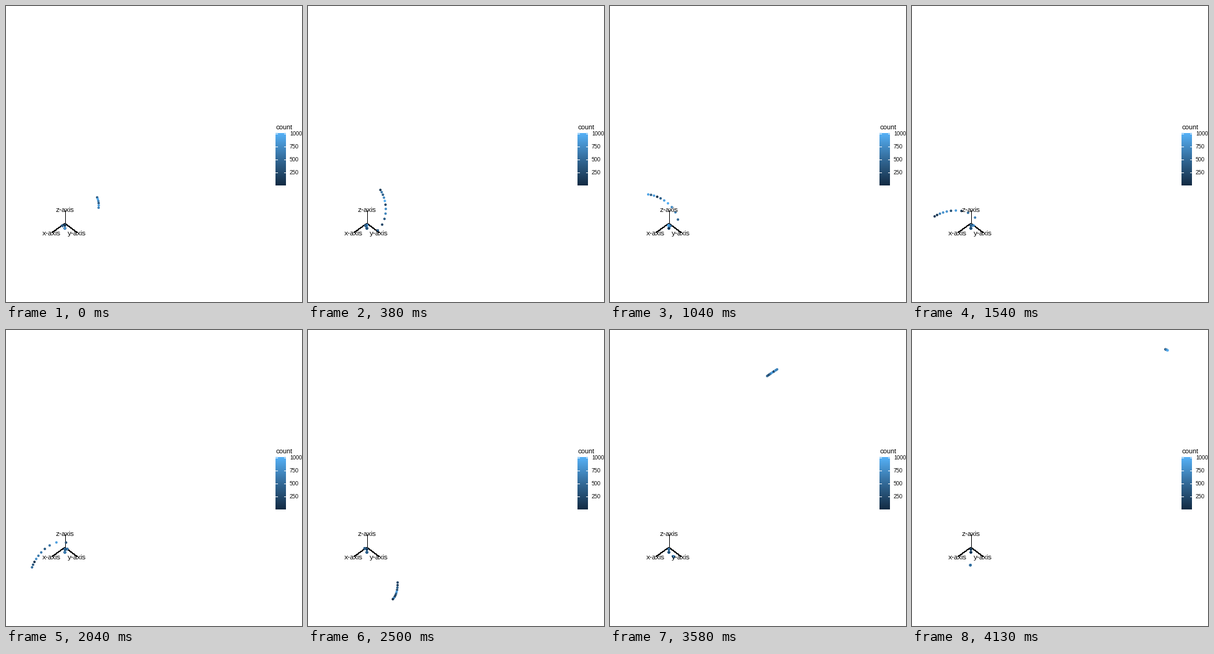
Animation, 480 px wide and 480 px high, one loop 4.17 s. Source, as a matplotlib script:

```python
import numpy as np
import matplotlib.pyplot as plt
from matplotlib.animation import FuncAnimation
from matplotlib.colors import LinearSegmentedColormap

SIZE = 480
POSES = 100
STEPS = 1000
TICK_MS = 10
TICKS = 417
CENTER = np.array([95.0, 355.0])
SLOWING = 499   # step where the orbit starts to widen
KICK = 773      # step of the last close pass, after which the comet leaves

plt.rcParams.update({
    "font.family": "Liberation Sans",
    "text.hinting": "native",
    "text.hinting_factor": 1,
})
cmap = LinearSegmentedColormap.from_list(
    "blues", ["#132B43", "#336A98", "#56B1F7"])


def kepler(m, e):
    """Eccentric anomaly from mean anomaly."""
    m = (m + np.pi) % (2 * np.pi) - np.pi
    ecc = np.pi * np.sign(m)
    for _ in range(40):
        ecc -= (ecc - e * np.sin(ecc) - m) / (1 - e * np.cos(ecc))
    return ecc


def ellipse(m, a, e, peri):
    """Clockwise Kepler orbit around CENTER; peri in degrees."""
    ecc = kepler(m, e)
    z = a * (np.cos(ecc) - e) - 1j * a * np.sqrt(1 - e**2) * np.sin(ecc)
    z = z * np.exp(1j * np.radians(peri))
    return CENTER + np.column_stack([z.real, -z.imag])


def comet_path(s):
    """Precessing rosette, then one long ellipse outwards."""
    turns = .581 + s / 40.2 - .00295 * np.maximum(s - SLOWING, 0)
    bound = ellipse(
        2 * np.pi * turns,
        a=np.interp(s, [SLOWING, 600, KICK], [44, 54, 45]),
        e=np.interp(s, [0, SLOWING, KICK], [.60, .76, .69]),
        peri=np.interp(s, [0, 90, SLOWING, KICK], [-130, -83, 56, 193]))
    escape = ellipse(.0123 * (s - KICK), 235, .947, 231 - .033 * (s - KICK))
    return np.where((s < KICK)[:, None], bound, escape)


def heavy_path(s, comet):
    """Recoil of the heavy body, then its slow drift."""
    recoil = CENTER - (comet - CENTER) * (.075, .02)
    t = [KICK, 800, 868, 923, 999]
    drift = np.column_stack([np.interp(s, t, [95, 82, 103, 101, 94]),
                             np.interp(s, t, [355, 358, 367, 374, 381])])
    return np.where((s < KICK)[:, None], recoil, drift)


steps = np.arange(STEPS, dtype=float)
comet = comet_path(steps)
bodies = [
    np.tile(CENTER + (0, 5), (STEPS, 1)),
    np.tile(CENTER, (STEPS, 1)),
    heavy_path(steps, comet),
    comet,
]
rng = np.random.default_rng(11)
colors = [cmap(rng.permutation(STEPS) / (STEPS - 1)) for _ in bodies]

fig = plt.figure(figsize=(SIZE / 72, SIZE / 72), dpi=72, facecolor="white")
ax = fig.add_axes([0, 0, 1, 1])
ax.axis("off")


def label(x, y, text, size, ha="left"):
    ax.text(x, y, text, size=size, ha=ha, va="center_baseline",
            color="black", zorder=5)


# Axis tripod
for name, dx, dy, gap in [("x-axis", -21, 15, 1.5), ("y-axis", 20, 15, 1.5),
                          ("z-axis", 0, -22, -.5)]:
    ax.plot([95.5, 95.5 + dx], [352.5, 352.5 + dy], color="black", lw=.75,
            solid_capstyle="butt", antialiased=False, zorder=2)
    label(95.3 + dx, 352 + dy + gap, name, 11, "center")

# Colour bar
ax.imshow(np.linspace(1, 0, 256)[:, None], cmap=cmap, aspect="auto",
          extent=(437, 454, 291, 206), interpolation="bilinear", zorder=2)
label(437, 195.5, "count", 11)
for value in range(1000, 0, -250):
    y = 206.5 + (1000 - value) * 84.5 / 999
    ax.hlines([y, y], [437, 450.6], [440.4, 454], color="white", lw=1,
              antialiased=False, zorder=3)
    label(460, y, str(value), 9)

ax.set(xlim=(0, SIZE), ylim=(SIZE, 0))
dots = ax.scatter([], [], s=16, linewidths=0, zorder=4)


def update(tick):
    # 24 poses per second, each start rounded to a whole tick
    pose = (6 * tick + 2) // 25
    shown = np.abs(steps - pose * (STEPS - 1) / (POSES - 1)) < 5.2
    dots.set_offsets(np.vstack([b[shown] for b in bodies]) + .5)
    dots.set_facecolors(np.vstack([c[shown] for c in colors]))
    return dots,


anim = FuncAnimation(fig, update, frames=TICKS, interval=TICK_MS,
                     repeat=True, repeat_delay=0, blit=False)
plt.show()
```
